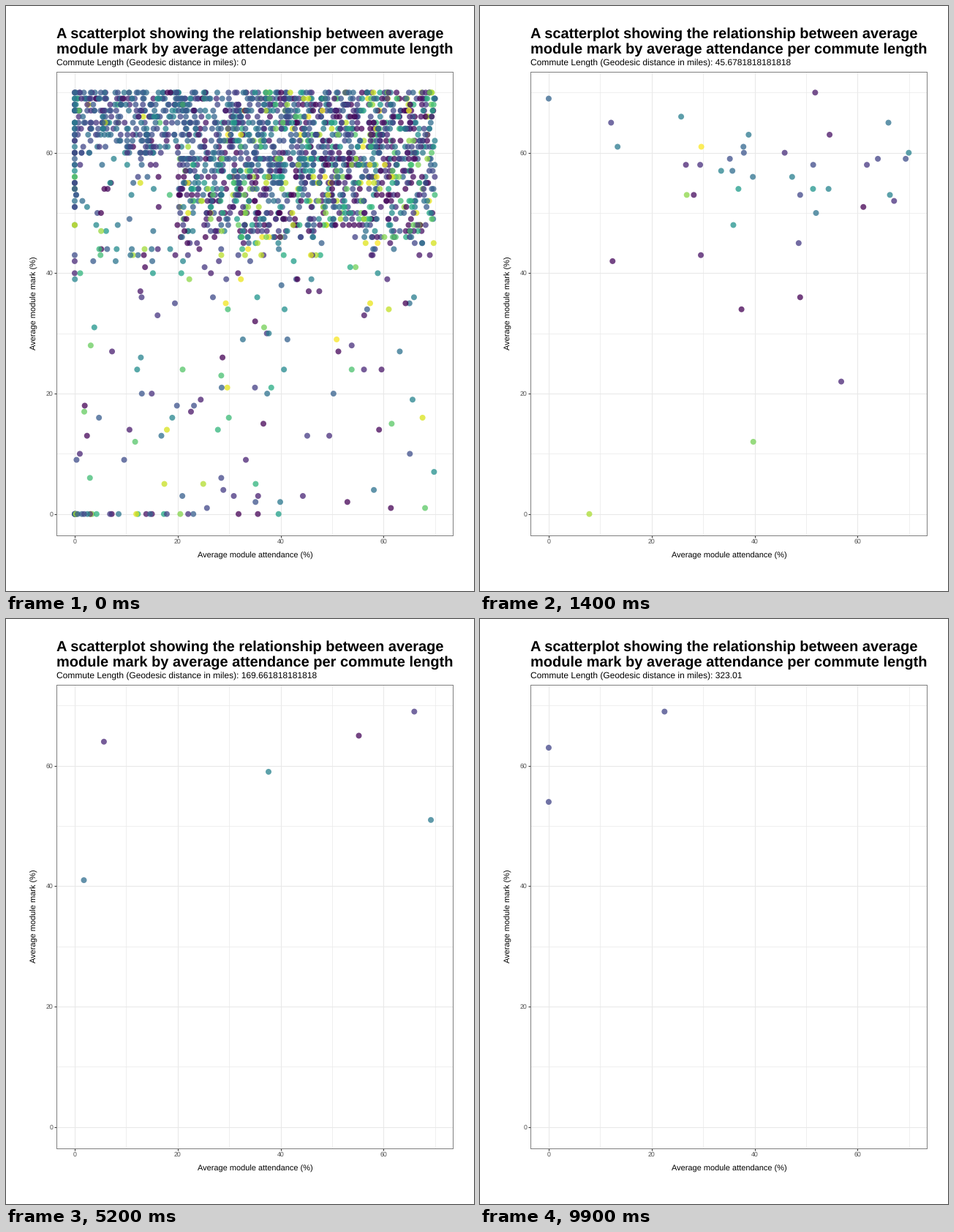
These frames come from a looping animation (640 by 800 pixels, 10000 ms). A matplotlib script:

```python
import numpy as np
import matplotlib.pyplot as plt
from matplotlib.animation import FuncAnimation

W, H, DPI = 640, 800, 100
FRAMES, INTERVAL = 100, 100
MAX_MILES = 323.01
PT = 72 / DPI
ALPHA = 0.75
LAST_CROWD = 75

plt.rcParams["font.family"] = "Liberation Sans"
plt.rcParams["text.hinting"] = "none"

# The few students with very long commutes: (attendance, mark, colour level)
LONE = {
    76: [(50.6, 45, 0.3)],
    82: [(27.3, 62, 0.5)],
    88: [(51.4, 58, 0.25)],
    99: [(22.5, 69, 0.2), (0, 63, 0.2), (0, 54, 0.2)],
}


def mark_weights(k):
    """Short commutes pile up at high marks, longer ones spread around 59."""
    y = np.arange(71)
    near = np.where(y > 45, 40 + 3 * (y - 46), 2 + 14 * np.exp((y - 45) / 5))
    near[0] = 26
    far = np.exp(-((y - 59) / 9) ** 2 / 2)
    tail = 0.04 * np.exp(-k / 20)
    far += tail
    far[0] += 18 * tail
    mix = np.exp(-k / 2)
    return mix * near / near.sum() + (1 - mix) * far / far.sum()


def attendance(rng, y):
    n = len(y)
    high = 70 * rng.beta(1.1, 1, n)
    middle = np.where(rng.random(n) < 0.82, 20 + 50 * rng.beta(1, 1.1, n), high)
    low = 70 * rng.beta(1, 1.4, n)
    zero = 70 * rng.beta(0.6, 2, n)
    x = np.select([y >= 60, y >= 45, y > 0], [high, middle, low], zero)
    x[rng.random(n) < 0.02] = 0
    return x


def colour_levels(rng, x, y, k):
    """Blues at low attendance and high marks, both ends of viridis elsewhere."""
    n = len(x)
    blue = np.clip(rng.normal(0.28, 0.1, n), 0, 1)
    wide = rng.beta(0.5, 0.9 - 0.2 * (1 - np.exp(-k / 3)), n)
    chance = np.where(y > 56, np.clip(1.1 - x / 70, 0.25, 0.9), 0.2)
    return np.where(rng.random(n) < chance, blue, wide)


def marks(k):
    if k > LAST_CROWD:
        rows = np.array(LONE.get(k, []), float).reshape(-1, 3)
        return rows[:, :2], rows[:, 2]
    rng = np.random.default_rng(400 + k)
    n = round(2000 * np.exp(-k / 2.7) + 60 * np.exp(-k / 22))
    y = rng.choice(71, n, p=mark_weights(k))
    x = attendance(rng, y)
    return np.column_stack([x, y]), colour_levels(rng, x, y, k)


fig = plt.figure(figsize=(W / DPI, H / DPI), dpi=DPI, facecolor="white")


def put(x, y, text, size, **kw):
    return fig.text(x / W, 1 - y / H, text, fontsize=size * PT,
                    va="baseline", **kw)


LEFT, TOP, RIGHT, BOTTOM = 69.3, 89.55, 611.4, 723.55
ax = fig.add_axes([LEFT / W, 1 - BOTTOM / H,
                   (RIGHT - LEFT) / W, (BOTTOM - TOP) / H])
ax.set(xlim=(-3.5, 73.5), ylim=(-3.5, 73.5))
ax.set_axisbelow(True)
for axis in (ax.xaxis, ax.yaxis):
    axis.set_ticks([0, 20, 40, 60])
    axis.set_ticks([10, 30, 50, 70], minor=True)
ax.grid(which="major", color="#e8e8e8", lw=1.07 * PT)
ax.grid(which="minor", color="#ebebeb", lw=0.75 * PT)
ax.tick_params(which="major", length=2.75 * PT, width=1.07 * PT,
               color="#333333", labelleft=False, labelbottom=False)
ax.tick_params(which="minor", length=0)
for spine in ax.spines.values():
    spine.set(color="#7f7f7f", linewidth=PT)

for v in (0, 20, 40, 60):
    put(93.8 + 7.045 * v, 735.2, str(v), 8.8, color="#4d4d4d", ha="center")
    put(64.2, 697.8 - 8.237 * v, str(v), 8.8, color="#4d4d4d", ha="right")

put(69, 43.3, "A scatterplot showing the relationship between average", 20,
    weight="bold")
put(69, 65, "module mark by average attendance per commute length", 20,
    weight="bold")
put(340.4, 755.2, "Average module attendance (%)", 11, ha="center")
put(42.2, 406, "Average module mark (%)", 11, ha="center", rotation=90,
    rotation_mode="anchor")
subtitle = put(69, 81.1, "", 12)

dots = ax.scatter([], [], s=(8 * PT) ** 2, linewidths=0, zorder=2)
viridis = plt.get_cmap("viridis")


def update(k):
    miles = k * MAX_MILES / (FRAMES - 1)
    subtitle.set_text(
        f"Commute Length (Geodesic distance in miles): {miles:.15g}")
    xy, level = marks(k)
    dots.set_offsets(xy)
    dots.set_facecolors(viridis(level, alpha=ALPHA))
    return dots, subtitle


anim = FuncAnimation(fig, update, frames=FRAMES, interval=INTERVAL,
                     repeat=True, repeat_delay=0, blit=False)
plt.show()
```
